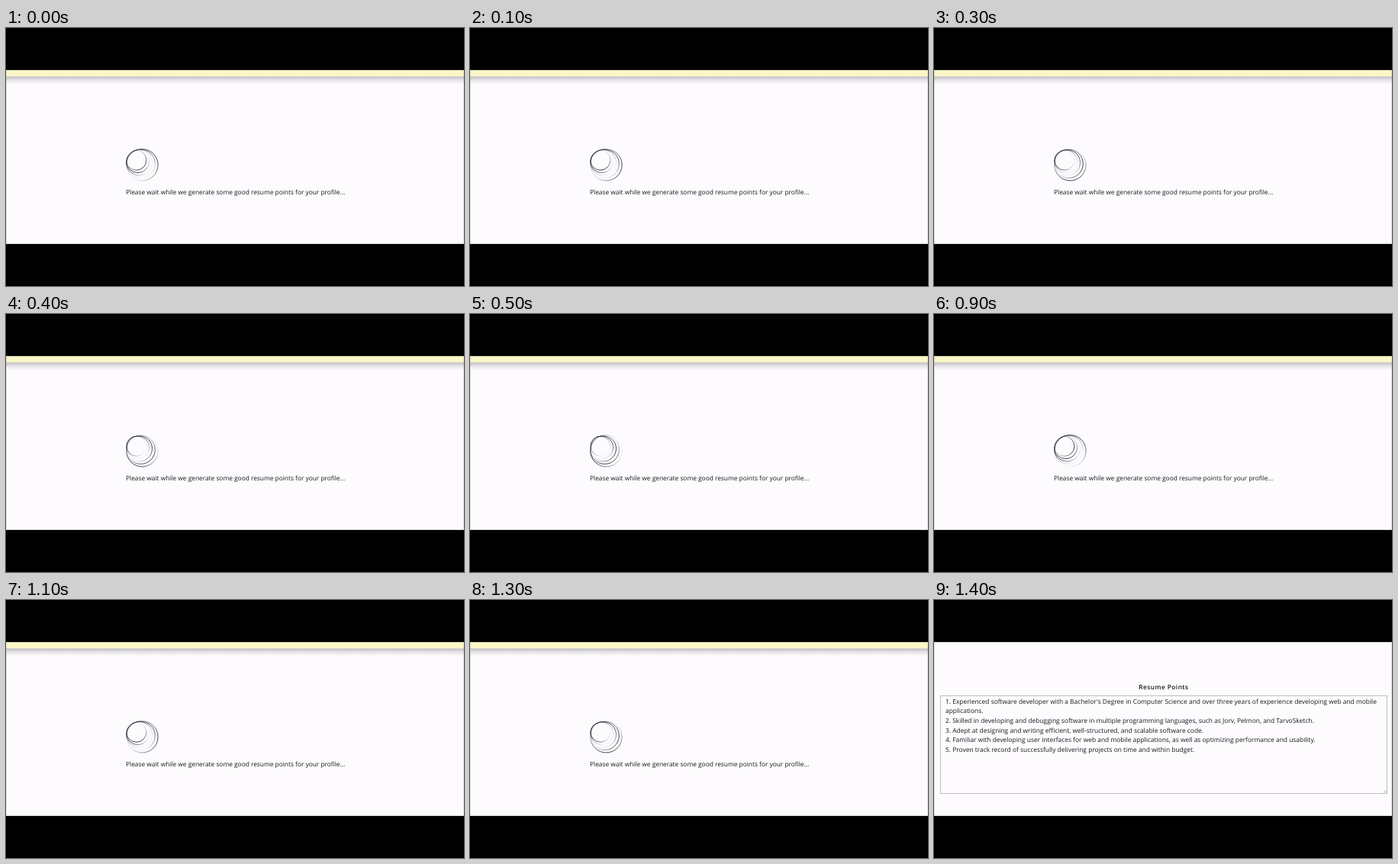
Animation of 600 by 338 pixels, one loop 3500 ms. Source, as an HTML page with a canvas:

```html
<!DOCTYPE html>
<html lang="en">
<head>
<meta charset="utf-8">
<title>Resume points</title>
<style>
  html, body { margin: 0; width: 100%; height: 100%; overflow: hidden; background: #000; }
  svg, canvas { position: absolute; left: 0; top: 0; }
  text { font: 8.42px "Open Sans", sans-serif; fill: #19191c; text-rendering: geometricPrecision; }
  #wait text { font-size: 8.36px; }
  #result .title { font-size: 8.3px; font-weight: 600; letter-spacing: .46px; }
</style>
</head>
<body>
<svg width="600" height="338" viewBox="0 0 600 338">
  <defs>
    <linearGradient id="shade" x2="0" y2="1">
      <stop offset="0" stop-color="#bdbcc0"/>
      <stop offset=".4" stop-color="#e2e0e4"/>
      <stop offset="1" stop-color="#fdfbfe"/>
    </linearGradient>
  </defs>
  <rect y="55" width="600" height="228" fill="#fdfbfe"/>
  <g id="wait">
    <rect y="55" width="600" height="8.5" fill="#fbf8c8"/>
    <rect y="63.5" width="600" height="10" fill="url(#shade)"/>
    <text x="157" y="217.7">Please wait while we generate some good resume points for your profile...</text>
  </g>
  <g id="result">
    <text class="title" x="268.3" y="117">Resume Points</text>
    <rect x="8.5" y="125.5" width="585" height="128" fill="none" stroke="#bfbec1"/>
    <path d="M589 252.5l3.5-3.5M591 252.5l1.5-1.5" stroke="#8c8b8e" stroke-width=".7"/>
  </g>
  <rect x=".5" y="55.5" width="599" height="227" fill="none" stroke="#888" stroke-opacity=".3"/>
</svg>
<canvas id="rings" width="600" height="338"></canvas>
<script>
const LOOP = 3500, WAIT = 1400, STEP = 100, TURN = 1000, RINGS = 5;
const lines = [
  "1. Experienced software developer with a Bachelor's Degree in Computer Science and over three years of experience developing web and mobile",
  "applications.",
  "2. Skilled in developing and debugging software in multiple programming languages, such as Jorv, Pelmon, and TarvoSketch.",
  "3. Adept at designing and writing efficient, well-structured, and scalable software code.",
  "4. Familiar with developing user interfaces for web and mobile applications, as well as optimizing performance and usability.",
  "5. Proven track record of successfully delivering projects on time and within budget."
];
const byId = id => document.getElementById(id);
const wait = byId("wait"), result = byId("result"), rings = byId("rings");
const ctx = rings.getContext("2d");

lines.forEach((line, i) => {
  const text = document.createElementNS("http://www.w3.org/2000/svg", "text");
  text.setAttribute("x", 15);
  text.setAttribute("y", 135.8 + i * 12.57);
  text.textContent = line;
  result.append(text);
});

// A ring whose ink is darkest at the given angle and fades around it
function drawRing(x, y, r, angle) {
  const ink = ctx.createConicGradient(angle, x, y);
  for (let k = 0; k <= 24; k++) {
    const glow = (1 + Math.cos(k / 12 * Math.PI)) / 2;
    ink.addColorStop(k / 24, `rgba(24,24,30,${0.05 + 0.9 * glow ** 1.4})`);
  }
  ctx.strokeStyle = ink;
  ctx.lineWidth = 0.85;
  ctx.beginPath();
  ctx.arc(x, y, r, 0, 2 * Math.PI);
  ctx.stroke();
}

function drawRings(t) {
  ctx.clearRect(0, 0, 600, 338);
  for (let i = 0; i < RINGS; i++) {
    const u = i / (RINGS - 1);
    const angle = 2 * Math.PI * (t / TURN - i / RINGS) - 0.44;
    drawRing(178.4 - 7.5 * u, 179.3 - 6.1 * u, 20.7 - 7.7 * u, angle);
  }
}

function show(node, on) {
  node.style.display = on ? "" : "none";
}

const start = performance.now();
function frame() {
  const t = Math.floor((performance.now() - start) % LOOP / STEP) * STEP;
  const waiting = t < WAIT;
  show(wait, waiting);
  show(rings, waiting);
  show(result, !waiting);
  if (waiting) drawRings(t);
  requestAnimationFrame(frame);
}
frame();
</script>
</body>
</html>
```
